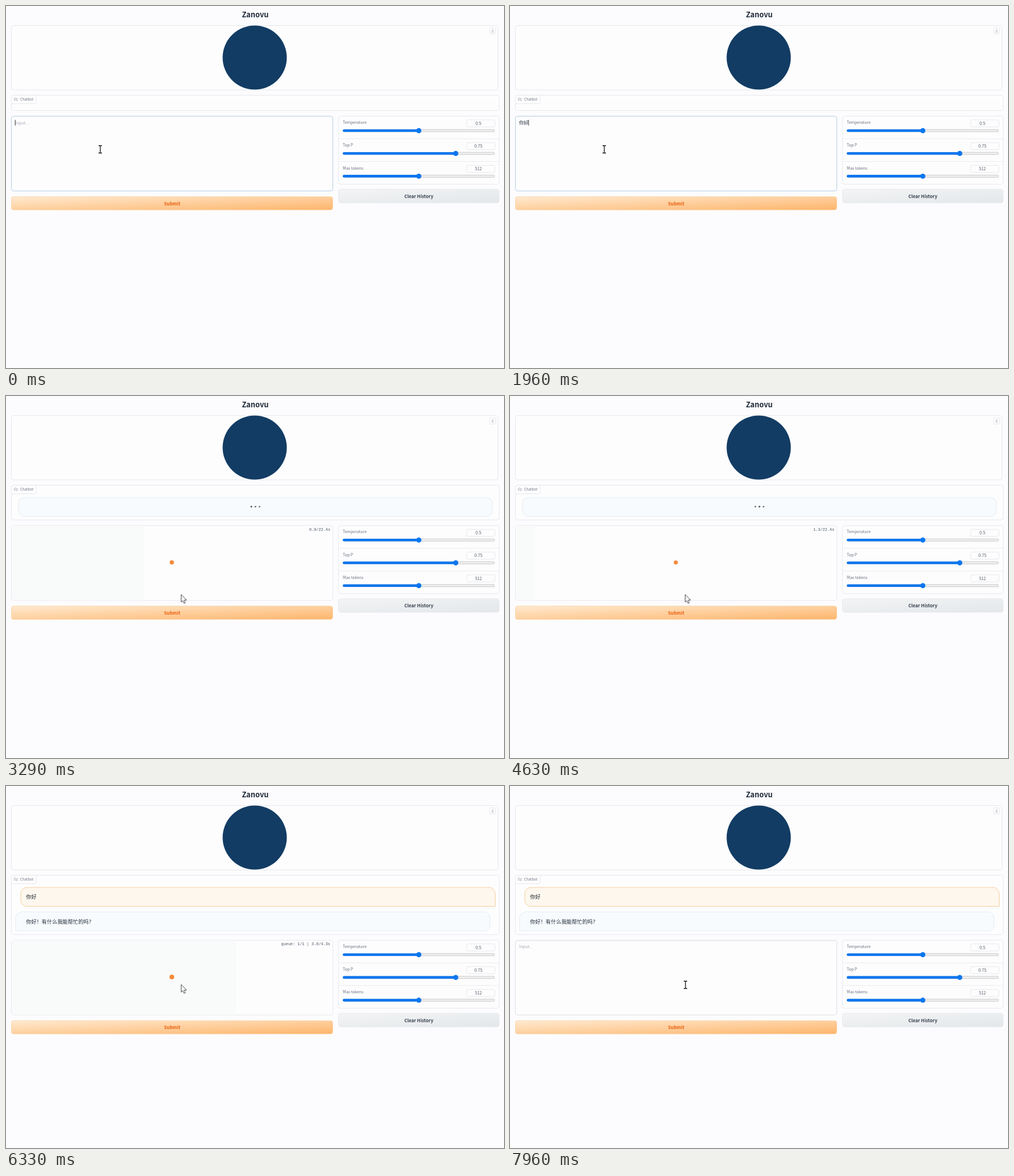
These frames come from a looping animation (877 px wide and 639 px high, 8000 ms). An HTML page:

```html
<!DOCTYPE html>
<html lang="zh-CN">
<head>
<meta charset="utf-8">
<title>Zanovu</title>
<style>
  html, body { margin: 0; width: 100%; height: 100%; overflow: hidden; background: #fcfcfe; }
  svg { display: block; width: 100vw; height: 100vh; }
  text { font-family: "Noto Sans CJK SC", "Noto Sans CJK", "Noto Sans", sans-serif; font-size: 7px; fill: #6b7280; }
  .title { font-size: 12.9px; font-weight: 600; fill: #1f2937; text-anchor: middle; }
  .button { font-size: 8px; font-weight: 600; fill: #374151; text-anchor: middle; }
  .submit { fill: #e8600f; }
  .number { font-size: 7.2px; fill: #4b5563; text-anchor: middle; }
  .message { font-size: 9.2px; fill: #1f2937; }
  .typed { font-size: 8.2px; fill: #1f2937; }
  .hint { font-size: 7.2px; fill: #a3a8b1; }
  .status { font-family: "Liberation Mono", monospace; font-size: 6.87px; fill: #4b5563; text-anchor: end; }
  .panel { fill: #fdfdfe; stroke: #e8e8ed; }
  .icon { fill: none; stroke: #9ca3af; stroke-width: .7; }
  .pointer { fill: #fff; stroke: #333; stroke-width: .9; stroke-linejoin: round; }
</style>
</head>
<body>
<svg viewBox="0 0 877 639" preserveAspectRatio="none">
  <defs>
    <linearGradient id="orange" x2="1" y2="1"><stop stop-color="#ffead0"/><stop offset="1" stop-color="#fdb56c"/></linearGradient>
    <linearGradient id="gray" x2="1" y2="1"><stop stop-color="#f3f4f5"/><stop offset="1" stop-color="#e3e7ea"/></linearGradient>
  </defs>

  <text class="title" x="439" y="20">Zanovu</text>
  <rect class="panel" x="9.5" y="34.5" width="857" height="113.5" rx="4"/>
  <circle cx="438" cy="91" r="56.5" fill="#123c64"/>
  <rect class="panel" x="851.5" y="38.5" width="11" height="11" rx="2"/>
  <path class="icon" d="M857 41v3.6m-1.6-1.5 1.6 1.6 1.6-1.6M854.6 46.2h4.8"/>

  <rect class="panel" id="chat" x="9.5" y="157.5" width="859" height="27" rx="4"/>
  <path class="panel" d="M9.5 172.5v-11a4 4 0 0 1 4-4h39.5v12a3 3 0 0 1-3 3z"/>
  <path class="icon" d="M14.5 162.5h3.5v3h-2l-1.5 1.5zM19 163.5h1.2v3.6h-3"/>
  <text x="25" y="166.8" style="font-size:6.2px">Chatbot</text>

  <g id="pending">
    <rect x="22" y="179" width="834.5" height="33.5" rx="11" fill="#f8fbfe" stroke="#e3ebf2"/>
    <g id="dots" fill="#1f2937"><circle cx="432" cy="195.3" r="1.5"/><circle cx="439.2" cy="195.3" r="1.5"/><circle cx="446.5" cy="195.3" r="1.5"/></g>
  </g>
  <g id="messages">
    <path d="M37 179h813.5a11 11 0 0 1 11 11v22.5H37a11 11 0 0 1-11-11V190a11 11 0 0 1 11-11z" fill="#fef7ed" stroke="#f2cf9d"/>
    <text class="message" x="35.3" y="199.2">你好</text>
    <path d="M28 222.3h813.5a11 11 0 0 1 11 11v11.5a11 11 0 0 1-11 11H17V233.300a11 11 0 0 1 11-11z" fill="#f8fbfe" stroke="#e3ebf2"/>
    <text class="message" x="35.3" y="242.600">你好！有什么我能帮忙的吗？</text>
  </g>

  <g id="controls">
    <rect id="field" class="panel" x="9.5" y="194.500" width="566" height="132" rx="4"/>
    <path id="inset" d="M12 195.700h561" stroke="#eeeef2"/>
    <text id="hint" class="hint" x="16" y="208.600">Input...</text>
    <text id="typed" class="typed" x="16" y="208.900">你好</text>
    <path id="caret" stroke="#222" stroke-width=".9"/>
    <g id="loading">
      <rect id="bar" x="10" y="195" height="131" fill="#f9fbfb"/>
      <circle id="loader" cx="292" cy="259.500" r="4" fill="#f58a3a"/>
      <text id="status" class="status" x="571" y="203.700"></text>
    </g>
    <rect x="9.5" y="336.500" width="566" height="23.500" rx="4" fill="url(#orange)" stroke="#fbd2a2" stroke-width=".8"/>
    <text class="button submit" x="292.700" y="351.700">Submit</text>
    <rect class="panel" x="585.500" y="194.500" width="283" height="120" rx="4"/>
    <path d="M586 234.500h282M586 274.500h282" stroke="#ebebef"/>
    <g id="sliders"></g>
    <rect x="585.500" y="323.500" width="283" height="24" rx="4" fill="url(#gray)" stroke="#e6e8ec" stroke-width=".8"/>
    <text class="button" x="727" y="339">Clear History</text>
  </g>

  <g id="cursor">
    <path id="beam" d="M-3-6.500h2.200l.8.700.8-.7h2.200M0-6v12M-3 6.500h2.200l.8-.7.8.7h2.200" fill="none" stroke="#111" stroke-width="1.300"/>
    <path id="arrow" class="pointer" d="M-.5-.5v13.300l3-2.700 2.100 4.900 2.300-1-2.100-4.800h4.200z"/>
    <path id="hand" class="pointer" d="M-1.500 10V1q0-1.500 1.300-1.500T1.100 1v5q2.300-.8 2.600.8 2.200-.7 2.500 1 2.200-.3 2.200 1.700v3.500l-1.500 4H.5l-4.300-6q-.8-2 .8-2z"/>
  </g>
</svg>

<script>
const LOOP = 8000;
const TYPED = 900, MOVE_START = 2050, MOVE_END = 2650, CLICK = 3270;
const TIMER_START = 3325, QUEUED = 5200, ANSWERED = 5980, DONE = 6650;

const el = id => document.getElementById(id);
const show = (id, on) => el(id).setAttribute("visibility", on ? "visible" : "hidden");
const set = (id, attrs) => Object.entries(attrs).forEach(([k, v]) => el(id).setAttribute(k, v));
const mix = (a, b, p) => a + (b - a) * p;
const clamp = v => Math.min(1, Math.max(0, v));

const sliders = [["Temperature", "0.5", 727], ["Top P", "0.75", 792], ["Max tokens", "512", 727]];
el("sliders").innerHTML = sliders.map(([label, value, x], i) => `
  <g transform="translate(0 ${i * 40.2})">
    <text x="593" y="208.200">${label}</text>
    <rect class="panel" x="811" y="201" width="50" height="12.500" rx="3"/>
    <text class="number" x="832" y="209.900">${value}</text>
    <rect x="593.500" y="218" width="267" height="4" rx="2" fill="#efefef" stroke="#b8b8b8" stroke-width=".7"/>
    <rect x="593" y="217.700" width="${x - 593}" height="4.600" rx="2.300" fill="#0b76ef"/>
    <circle cx="${x}" cy="220" r="4.500" fill="#0b76ef"/>
  </g>`).join("");

function drawField(t) {
  const focused = t < CLICK, loading = t >= CLICK && t < DONE, typed = focused && t >= TYPED;
  set("field", { style: focused ? "stroke:#b3cde0" : loading ? "" : "stroke:#dfdfe5" });
  show("inset", t >= DONE);
  show("hint", !loading && !typed);
  show("typed", typed);
  const blinkOn = (typed ? t - TYPED : t) % 1000 < 500;
  show("caret", focused && blinkOn);
  set("caret", { d: `M${typed ? 32.7 : 16.2} 201v10` });
  show("loading", loading);
}

function drawProgress(t) {
  const elapsed = Math.max(0, t - TIMER_START) / 1000;
  const queued = t >= QUEUED;
  const eta = !queued ? 22.4 : t < ANSWERED ? 4.2 : 4.3;
  const shown = (Math.floor(elapsed * 10 + 1e-6) / 10).toFixed(1);
  const level = t < TIMER_START ? 0.414 : elapsed / eta;
  set("bar", { width: 565 * clamp(level) });
  el("status").textContent = `${queued ? "queue: 1/1 | " : ""}${shown}/${eta}s`;
  set("loader", { r: 4 + 0.4 * Math.sin(t / 200) });
}

function drawChat(t) {
  const pending = t >= CLICK && t < ANSWERED, answered = t >= ANSWERED;
  const shift = answered ? 77.7 : pending ? 34.3 : 0;
  set("chat", { height: 27 + shift });
  set("controls", { transform: `translate(0 ${shift})` });
  show("pending", pending);
  show("messages", answered);
  [...el("dots").children].forEach((dot, i) => {
    const phase = (((t - CLICK) / 1000 - i * 0.33) % 1 + 1) % 1;
    dot.setAttribute("opacity", 0.5 + 0.6 * Math.abs(phase - 0.5));
  });
}

function drawCursor(t) {
  const p = clamp((t - MOVE_START) / (MOVE_END - MOVE_START));
  const eased = p * p * (3 - 2 * p);
  const x = mix(166, 309, eased), y = mix(253, 351, eased);
  const beforeClick = t < CLICK;
  const shape = t >= DONE || (beforeClick && y < 327) ? "beam" : beforeClick && y > 336 ? "hand" : "arrow";
  ["beam", "arrow", "hand"].forEach(id => show(id, id === shape));
  set("cursor", { transform: `translate(${x} ${y})` });
}

const start = performance.now();
function frame() {
  const t = (performance.now() - start) % LOOP;
  drawField(t);
  drawProgress(t);
  drawChat(t);
  drawCursor(t);
  requestAnimationFrame(frame);
}
frame();
</script>
</body>
</html>
```
